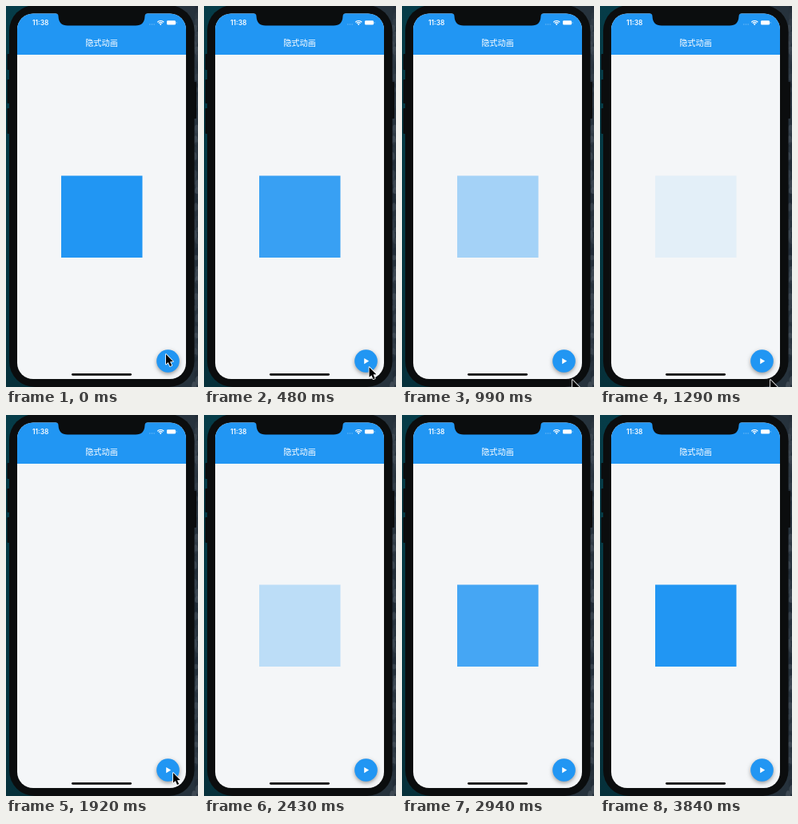
An HTML page with a canvas for the animation above (3.87 s loop, 240 by 477 pixels).

```html
<!DOCTYPE html>
<html lang="zh">
<head>
<meta charset="utf-8">
<title>隐式动画</title>
<style>
  html, body { margin: 0; width: 100%; height: 100%; overflow: hidden; background: #0b0e10; }
  canvas { display: block; width: 240px; height: 477px; }
</style>
</head>
<body>
<canvas id="stage"></canvas>
<script>
const W = 240, H = 477, LOOP = 3870;
const BLUE = '#2196f3', BEZEL = '#0b0d0e';
const canvas = document.getElementById('stage');
const ratio = window.devicePixelRatio || 1;
canvas.width = W * ratio;
canvas.height = H * ratio;
const ctx = canvas.getContext('2d');
ctx.scale(ratio, ratio);

const clamp = v => Math.max(0, Math.min(1, v));
const ease = v => v * v * (3 - 2 * v);

function rect(x, y, w, h, color) {
  ctx.fillStyle = color;
  ctx.fillRect(x, y, w, h);
}

function round(x, y, w, h, r, color) {
  ctx.beginPath();
  ctx.roundRect(x, y, w, h, r);
  ctx.fillStyle = color;
  ctx.fill();
}

function poly(points, color) {
  ctx.beginPath();
  points.forEach(([x, y]) => ctx.lineTo(x, y));
  ctx.closePath();
  ctx.fillStyle = color;
  ctx.fill();
}

function label(text, x, y, font, align) {
  ctx.font = font;
  ctx.textAlign = align;
  ctx.textBaseline = 'middle';
  ctx.fillStyle = '#fff';
  ctx.fillText(text, x, y);
}

function drawBackdrop() {
  const teal = ctx.createLinearGradient(0, 0, 0, H);
  teal.addColorStop(0, '#063c48');
  teal.addColorStop(0.6, '#043842');
  teal.addColorStop(1, '#06303a');
  rect(0, 0, 120, H, teal);
  rect(120, 0, 120, H, '#26323c');
  let seed = 7;
  const rand = () => (seed = seed * 16807 % 2147483647) / 2147483647;
  for (let y = 0; y < H; y += 7) {
    const tone = 30 + rand() * 45;
    ctx.beginPath();
    ctx.ellipse(235 + rand() * 5, y, 3, 3 + rand() * 4, 0, 0, Math.PI * 2);
    ctx.fillStyle = `rgba(${tone}, ${tone + 10}, ${tone + 20}, 0.7)`;
    ctx.fill();
  }
}

function drawPhone() {
  for (const [y, h] of [[60, 20], [92, 30], [128, 32]]) round(1.5, y, 5, h, 1, BEZEL);
  round(233, 95, 5, 46, 1, BEZEL);
  round(4, -1, 231.5, 478, 32, BEZEL);
}

function drawStatus() {
  label('11:38', 33, 21.5, '600 8.3px Inter, sans-serif', 'left');
  ctx.globalAlpha = 0.4;
  for (let i = 0; i < 4; i++) rect(179 + i * 2, 22.5, 1, 1, '#fff');
  ctx.globalAlpha = 1;

  ctx.strokeStyle = '#fff';
  ctx.lineWidth = 1.2;
  for (const r of [3.2, 5.3]) {
    ctx.beginPath();
    ctx.arc(193.2, 23.8, r, -Math.PI * 0.77, -Math.PI * 0.23);
    ctx.stroke();
  }
  poly([[193.2, 24.2], [191.9, 22.6], [193.2, 22], [194.5, 22.6]], '#fff');

  round(201, 18.2, 11, 5.4, 1.4, '#fff');
  rect(212.6, 20, 0.8, 1.8, 'rgba(255,255,255,0.6)');
}

function drawScreen(opacity) {
  ctx.save();
  ctx.beginPath();
  ctx.roundRect(14, 9.5, 211, 457.5, 20);
  ctx.clip();
  rect(14, 9, 211, 459, '#f4f6f8');
  rect(14, 9, 211, 52, BLUE);
  drawStatus();
  label('隐式动画', 119.5, 46.5, '500 10.2px "Noto Sans CJK SC", "Noto Sans CJK", sans-serif', 'center');

  ctx.globalAlpha = opacity;
  rect(69, 212.5, 101.5, 102.5, BLUE);
  ctx.globalAlpha = 1;

  round(82, 460, 75, 2.7, 1.35, '#080808');
  ctx.restore();

  // Notch with flared shoulders
  ctx.beginPath();
  ctx.moveTo(62, 9);
  ctx.quadraticCurveTo(65.5, 9.5, 65.5, 13);
  ctx.quadraticCurveTo(66, 24.5, 77, 24.5);
  ctx.lineTo(162, 24.5);
  ctx.quadraticCurveTo(173, 24.5, 173.5, 13);
  ctx.quadraticCurveTo(173.5, 9.5, 177, 9);
  ctx.closePath();
  ctx.fillStyle = BEZEL;
  ctx.fill();
}

function drawButton() {
  ctx.save();
  ctx.shadowColor = 'rgba(0,0,0,0.38)';
  ctx.shadowBlur = 5 * ratio;
  ctx.shadowOffsetY = 2 * ratio;
  round(188.2, 430.2, 28.6, 28.6, 14.3, BLUE);
  ctx.restore();
  poly([[200.2, 441], [206.2, 444.6], [200.2, 448.2]], '#fff');
}

// Pointer path: time, x, y
const path = [
  [0, 200, 436], [330, 200, 436], [630, 213, 468], [1560, 213, 468],
  [1920, 209, 448], [2040, 204, 440], [2200, 204, 440], [2410, 214, 480]
];

function drawPointer(t) {
  const i = path.findIndex(p => p[0] > t);
  if (i < 1) return;
  const [t0, x0, y0] = path[i - 1], [t1, x1, y1] = path[i];
  const k = ease((t - t0) / (t1 - t0));
  ctx.save();
  ctx.translate(x0 + (x1 - x0) * k, y0 + (y1 - y0) * k);
  ctx.beginPath();
  [[0, 0], [0, 12.5], [2.8, 10], [5, 15], [7.2, 14], [5, 9.2], [8.8, 9]]
    .forEach(([x, y]) => ctx.lineTo(x, y));
  ctx.closePath();
  ctx.lineJoin = 'round';
  ctx.lineWidth = 1.7;
  ctx.strokeStyle = '#fff';
  ctx.stroke();
  ctx.fillStyle = '#000';
  ctx.fill();
  ctx.restore();
}

function boxOpacity(t) {
  return t < 1800 ? 1 - clamp((t - 370) / 1000) : clamp((t - 2195) / 900);
}

function frame(now) {
  const t = now % LOOP;
  drawBackdrop();
  drawPhone();
  drawScreen(boxOpacity(t));
  drawButton();
  drawPointer(t);
  requestAnimationFrame(() => frame(performance.now()));
}
frame(performance.now());
</script>
</body>
</html>
```
